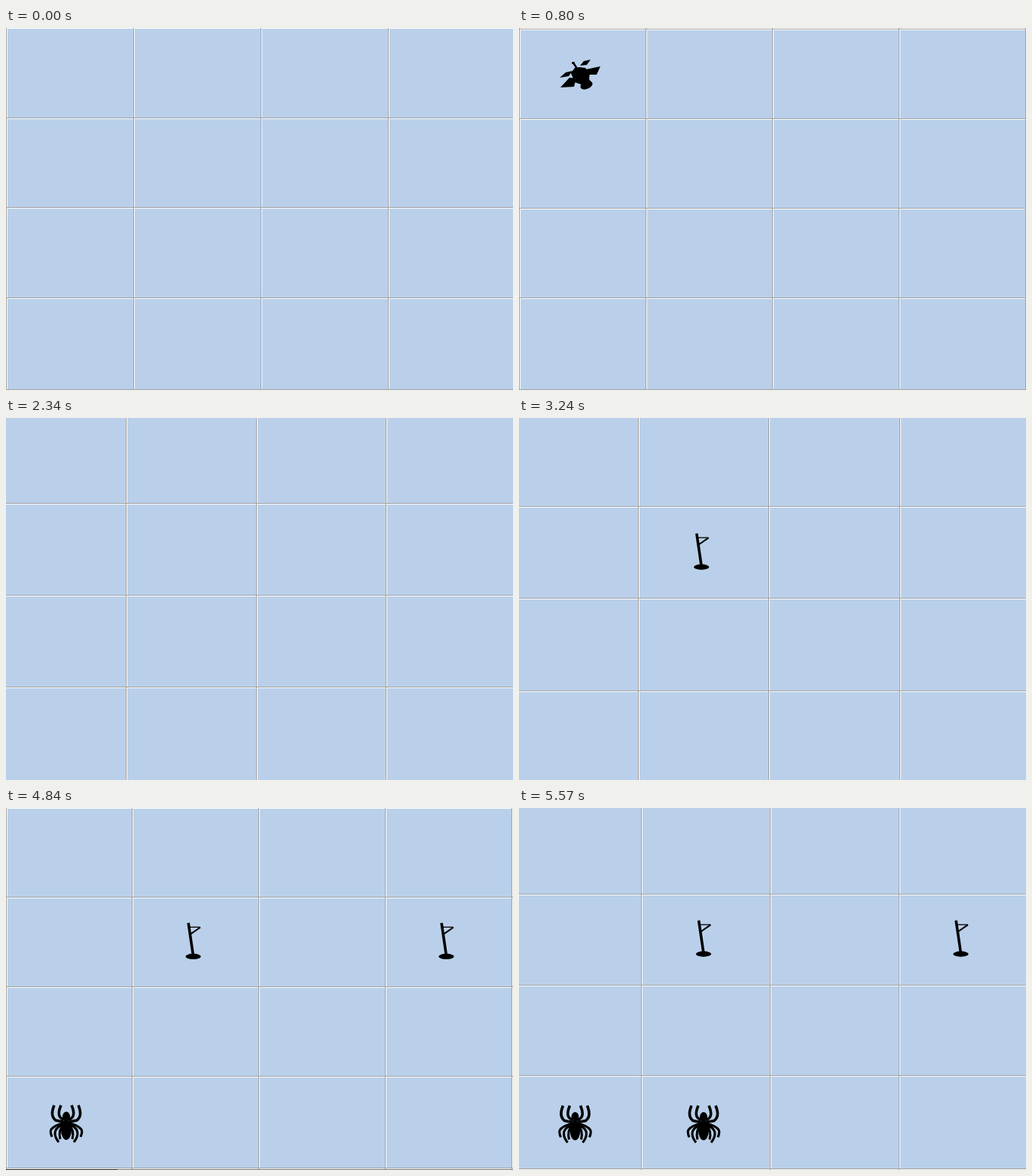
These frames come from a looping animation (673 px wide and 481 px high, 6200 ms). An HTML page with a canvas:

```html
<!DOCTYPE html>
<html>
<head>
<meta charset="utf-8">
<style>
html, body { margin: 0; width: 673px; height: 481px; overflow: hidden; }
canvas { display: block; }
</style>
</head>
<body>
<canvas id="stage" width="673" height="481"></canvas>
<script>
const ctx = document.getElementById('stage').getContext('2d');
const W = 673, H = 481, LOOP = 6200;

function rect(color, x, y, w, h) {
  ctx.fillStyle = color;
  ctx.fillRect(x, y, w, h);
}

function stroke(d, width) {
  ctx.lineWidth = width;
  ctx.stroke(new Path2D(d));
}

function ellipse(x, y, rx, ry, angle = 0) {
  ctx.beginPath();
  ctx.ellipse(x, y, rx, ry, angle, 0, 7);
  ctx.fill();
}

// Each icon is drawn around its own anchor point.
function flag() {
  ellipse(0, 0, 10.2, 3.7);
  stroke('M-6.4-44.5L0-1', 3.6);
  stroke('M-5-39L9-39', 1.3);
  stroke('M9.5-38.8L-4-29.5', 2.1);
}

function satellite() {
  ctx.fill(new Path2D('M-25 17L-13 4L-4 5L-7 16ZM-26 4L-18-3L-9-5L-14 2Z' +
    'M1-12L6-18L15-20L10-13ZM9-7L28-11L23 0L12 0Z' +
    'M-11-2L-6-9L0-10L8-9L14-2L13 6L17 11L5 14L-6 10Z'));
  stroke('M-8-16L-3-8', 2.5);
  ellipse(-8, -15.5, 2, 1.8);
  ellipse(9.5, 14, 8.5, 5, -0.4);
}

function spider() {
  ellipse(0, -9, 5, 6.5);
  ellipse(0, 8.5, 7, 13.5);
  for (const side of [-1, 1]) {
    ctx.save();
    ctx.scale(side, 1);
    stroke('M4-2L14-4Q22-10 16-24M3-5Q14-8 7-24', 3.6);
    stroke('M4 0Q15 2 20 8Q22 11 19 18M4 1Q15 6 15 13Q15 19 10 25M4 3Q11 9 8 21', 3.1);
    ctx.restore();
  }
}

const even = [[0, 168, 336, 504, 672], [1, 120, 239, 358, 480]];
const shifted = [[0, 167, 335, 503, 671], [-1, 118, 237, 356, 478]];
const twoFlags = [[flag, 248.5, 197.3], [flag, 584.5, 197.3]];

const scenes = [
  { start: 0, grid: [[0, 169, 338, 507], [-1, 119, 238, 358, 480]], icons: [] },
  { start: 800, grid: even, icons: [[satellite, 80, 62]] },
  { start: 1470, grid: even, icons: [[satellite, 80, 62], [flag, 249.3, 199.2]] },
  { start: 2340, grid: [[159, 332, 504], [113, 235, 357]], icons: [] },
  { start: 3240, grid: [[158, 331, 505], [117, 239, 362]], icons: [[flag, 242.2, 198]] },
  { start: 4070, grid: shifted, icons: twoFlags, edge: true },
  { start: 4840, grid: shifted, icons: [...twoFlags, [spider, 80, 419]], edge: true },
  { start: 5570, grid: [[162, 333, 504], [114, 235, 355, 479]],
    icons: [[flag, 245, 194], [flag, 586.5, 194], [spider, 74.5, 419.5], [spider, 245, 419.5]] }
];

function draw({ grid: [xs, ys], icons, edge }) {
  rect('#bad0ea', 0, 0, W, H);
  if (ys[0] === 1) rect('#fff', 0, 0, W, 1);
  for (const [color, offset] of [['#fff', 1], ['#a0a0a0', 0]]) {
    for (const x of xs) rect(color, x + offset, 0, 1, H);
    for (const y of ys) rect(color, 0, y + offset, W, 1);
  }
  if (edge) {
    rect('#777', 0, 480, W, 1);
    rect('#222', 0, 480, 148, 1);
  }
  ctx.fillStyle = ctx.strokeStyle = '#000';
  for (const [icon, x, y] of icons) {
    ctx.save();
    ctx.translate(x, y);
    icon();
    ctx.restore();
  }
}

function tick() {
  const time = performance.now() % LOOP;
  draw(scenes.findLast(scene => time >= scene.start));
  requestAnimationFrame(tick);
}
tick();
</script>
</body>
</html>
```
